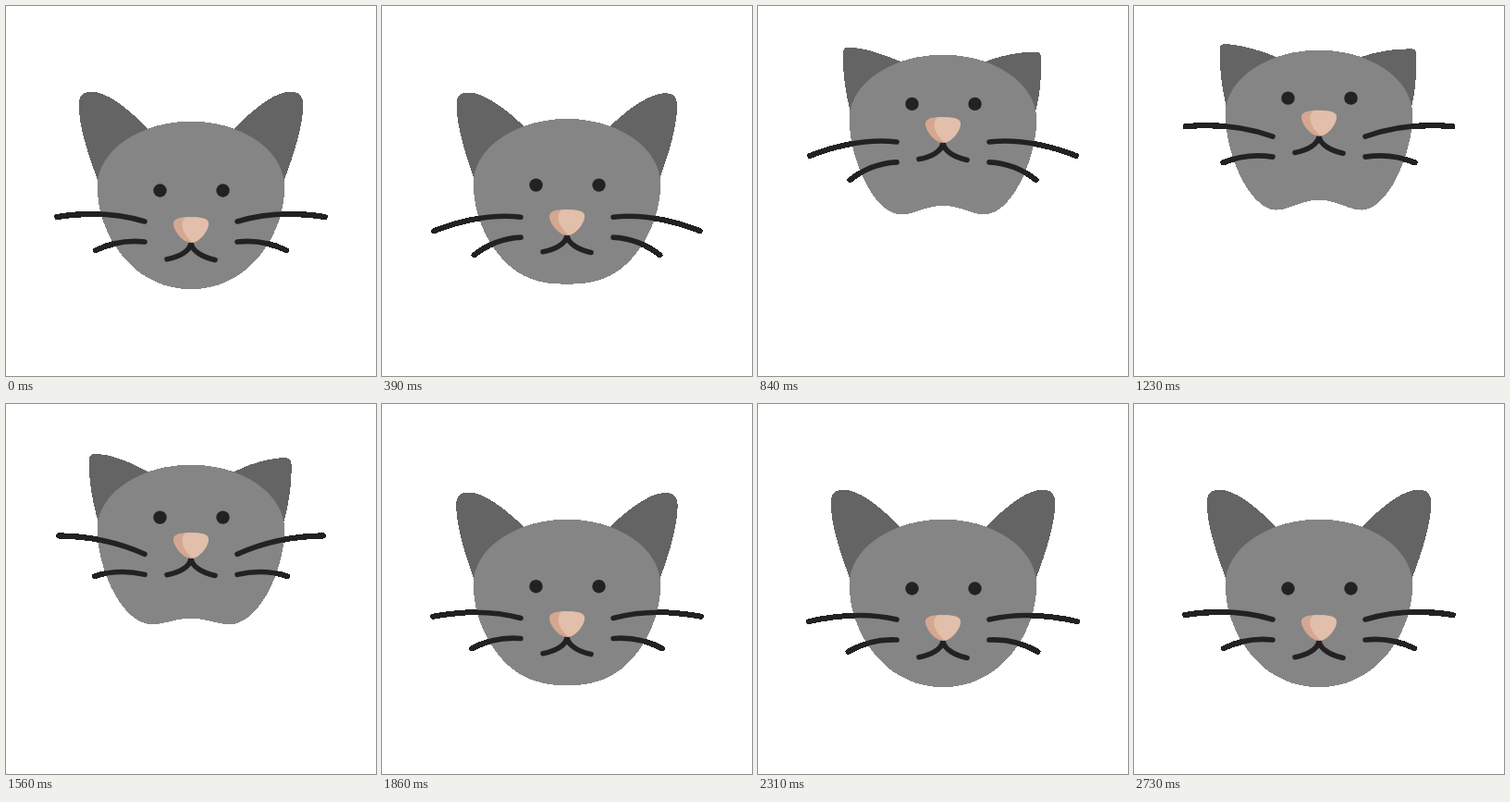
These frames come from a looping animation (400x400 px, 8090 ms). An HTML page:

```html
<!DOCTYPE html>
<html lang="en">
<head>
<meta charset="utf-8">
<title>Jumping cat</title>
<style>
  html, body { margin: 0; width: 100%; height: 100%; overflow: hidden; background: #fff; }
  svg { display: block; width: 100vw; height: 100vh; }
  .line { fill: none; stroke: #222; stroke-width: 5.6; stroke-linecap: round; stroke-linejoin: round; }
</style>
</head>
<body>
<svg viewBox="0 0 400 400">
  <!-- hard silhouette, smooth inner edges -->
  <filter id="hard" filterUnits="userSpaceOnUse" x="0" y="0" width="400" height="400" color-interpolation-filters="sRGB">
    <feComponentTransfer><feFuncA type="discrete" tableValues="0 1 1 1"/></feComponentTransfer>
  </filter>
  <g filter="url(#hard)">
    <path id="ears" fill="#646464"/>
    <path id="face" fill="#858585"/>
    <path id="whiskers" class="line"/>
    <g id="eyes" fill="#222">
      <circle cx="166.5" cy="199.5" r="7.2"/>
      <circle cx="234.5" cy="199.5" r="7.2"/>
    </g>
    <g id="muzzle">
      <path class="line" d="M174 273.7C187 271.5 199 265 200 256C201 265 213 272 226 274.5"/>
      <path fill="#d5a791" d="M200 228C210 228 219 229 219 235C219 244 208 256 200 256C192 256 181 244 181 235C181 229 190 228 200 228Z"/>
      <path fill="#e1bfaa" d="M194 228.3C188 234 189 245 202 255.8C210 254 219 243 219 235C219 229 208 228 194 228.3Z"/>
    </g>
  </g>
</svg>
<script>
const LOOP = 8090, STEP = 30, END = 2730;
const CROUCH = 350, PEAK = 1120, LAND = 1890, SETTLE = 2240;
const DIP = 9, SWING = 35, ROUND = 0.5523;

const $ = id => document.getElementById(id);
const lerp = (a, b, u) => a + (b - a) * u;
const clamp = u => Math.min(1, Math.max(0, u));
const ramp = (t, from, to) => (1 - Math.cos(Math.PI * clamp((t - from) / (to - from)))) / 2;
const both = half => half(-1) + half(1);

// Whisker tip height relative to its root: drags behind each move, then settles.
function whiskerTip(t) {
  return -5 + 20 * ramp(t, 0, CROUCH)
    + SWING * (ramp(t, 1680, 2030) - ramp(t, 900, 1400) - ramp(t, 2140, 2550))
    + 15 * ramp(t, 2500, END);
}

function whiskers(y, tip) {
  const low = 11.7 + 0.5 * tip;
  const reach = (length, rise) => Math.sqrt(length ** 2 - rise ** 2);
  return both(s => {
    const x = 200 + 50 * s;
    return `M${x} ${y}q${s * 43} ${0.42 * tip - 11} ${s * reach(95, tip)} ${tip}`
      + `M${x} ${y + 22}q${s * 28} ${0.22 * tip - 2} ${s * reach(54, low)} ${low}`;
  });
}

// Half of the face: quarter ellipse above, jowl corner and chin below.
function halfFace(s, mix, y) {
  const w = 101, top = y(125, 53), side = y(195, 122), chin = y(306, 215.5);
  const jx = mix(46.5, 47), jy = y(293.6, 225);
  const tx = mix(14, 13), ty = mix(8, 1.5), pull = 2.3;
  const p = (dx, py) => `${200 + s * dx} ${py} `;
  return 'M' + p(0, top)
    + 'C' + p(w * ROUND, top) + p(w, lerp(side, top, ROUND)) + p(w, side)
    + 'C' + p(w, side + 40) + p(jx + pull * tx, jy - pull * ty) + p(jx, jy)
    + 'C' + p(jx - tx, jy + ty) + p(18, chin) + p(0, chin) + 'Z';
}

// Ear: outer edge up from the cheek, rounded tip, slope down to the forehead.
function ear(s, mix, y) {
  const top = y(93, s < 0 ? 45 : 50), base = y(200, 127), h = base - top;
  const out = mix(121, s < 0 ? 108 : 106);
  const rx = mix(14, 5), ry = mix(14, 7), corner = 0.3;
  const p = (dx, py) => `${200 + s * dx} ${py} `;
  return 'M' + p(96, base)
    + 'C' + p(mix(110, 105), top + 0.67 * h) + p(out, top + 0.35 * h) + p(out, top + ry)
    + 'C' + p(out, top + ry * corner) + p(out - rx * corner, top) + p(out - rx, top)
    + 'C' + p(out - rx - 18, top) + p(62, y(116, 53)) + p(40, y(140, 63)) + 'Z';
}

function draw(time) {
  const t = Math.min(END, Math.floor(time / STEP) * STEP);
  const dip = DIP * (ramp(t, 0, CROUCH) - ramp(t, LAND, SETTLE));
  const away = clamp(Math.abs(t - PEAK) / (PEAK - CROUCH));
  const rise = 1.067 * (1 - away ** 2.75);

  const mix = (rest, up) => lerp(rest, up, rise);
  const y = (rest, up) => mix(rest + dip, up);
  const shape = (id, d) => $(id).setAttribute('d', d);
  const shift = (id, rest, up) => $(id).setAttribute('transform', `translate(0 ${y(rest, up) - rest})`);

  shape('ears', both(s => ear(s, mix, y)));
  shape('face', both(s => halfFace(s, mix, y)));
  shape('whiskers', whiskers(y(233, 147), whiskerTip(t)));
  shift('eyes', 199.5, 106);
  shift('muzzle', 256, 148);
}

const start = performance.now();
function tick() {
  draw((performance.now() - start) % LOOP);
  requestAnimationFrame(tick);
}
tick();
</script>
</body>
</html>
```
